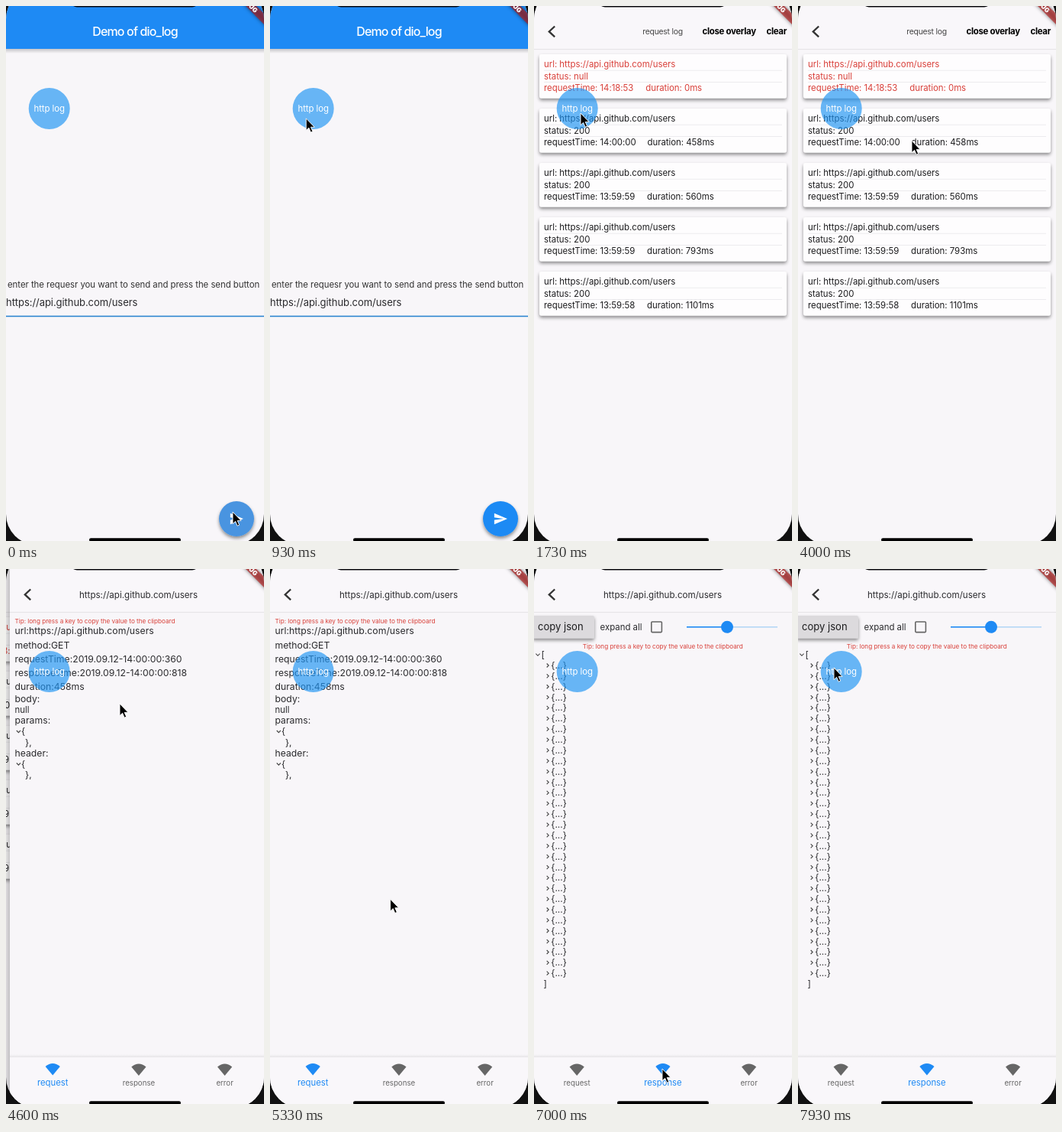
Write an HTML page that moves like this. It is 338x699 px and loops after 8 s.

```html
<!DOCTYPE html>
<html lang="en">
<head>
<meta charset="utf-8">
<title>HTTP log demo</title>
<style>
  html, body { margin: 0; width: 100%; height: 100%; overflow: hidden; background: #111; }
  svg { display: block; width: 100vw; height: 100vh; }
  text { font-family: Inter, "Open Sans", sans-serif; white-space: pre; }
</style>
</head>
<body>
<svg id="stage" viewBox="0 0 338 699" xmlns="http://www.w3.org/2000/svg"></svg>
<script>
const W = 338, LOOP = 8000;
const BLUE = '#1e8af4', INK = '#2b2b2e', RED = '#d9403a', PAPER = '#f8f6f9';
const URL_TEXT = 'https://api.github.com/users';
const TIP = 'Tip: long press a key to copy the value to the clipboard';

const text = (x, y, str, size = 11.43, attrs = '') =>
  `<text x="${x}" y="${y}" font-size="${size}" fill="${INK}" ${attrs}>${str}</text>`;
const rect = (x, y, w, h, fill, attrs = '') =>
  `<rect x="${x}" y="${y}" width="${w}" height="${h}" fill="${fill}" ${attrs}/>`;
const line = (d, color, width) =>
  `<path d="${d}" fill="none" stroke="${color}" stroke-width="${width}"/>`;
const styled = (color, spacing = 0, rest = '') =>
  `style="fill:${color};letter-spacing:${spacing}px" ${rest}`;
const MID = 'text-anchor="middle"';

const paper = () => rect(0, -23, W, 740, PAPER);
const edge = () => rect(-17, -23, 17, 740, 'url(#edge)');
const topBar = () =>
  rect(0, -23, W, 79, '#f9f7fa') + rect(0, 56, W, 1.5, 'url(#lineShade)') +
  line('M27.2 26.5L19.8 33.4L27.2 40.3', '#333', 2.3);

function homePage() {
  return paper() +
    rect(0, 56, W, 6, 'url(#barShade)') + rect(0, -23, W, 79, BLUE) +
    text(169, 39, 'Demo of dio_log', 16, styled('#fff', -0.85, MID + ' font-weight="500"')) +
    text(2, 367.5, 'enter the requesr you want to send and press the send button', 11.43, styled('#333', -0.05)) +
    text(0, 392.3, URL_TEXT, 13.06, styled(INK, -0.08)) +
    rect(0, 404.6, W, 1.6, '#2f86d0') +
    `<circle id="fab" cx="302" cy="670" r="23" filter="url(#lift)"/>
     <path transform="translate(292.2 660.2) scale(.816)" fill="#fff" d="M2 21L23 12 2 3v7l15 2-15 2z"/>`;
}

function card(y, status, time, duration, durationX, color) {
  const put = (x, dy, str) => text(x, y + dy, str, 11.43, styled(color, -0.03));
  return rect(7, y, 324, 57.5, '#fefdfe', 'rx="3" filter="url(#lift)"') +
    rect(13, y + 20.8, 312, .7, '#e6e4e8') + rect(13, y + 36.3, 312, .7, '#e6e4e8') +
    put(13, 17, 'url: ' + URL_TEXT) + put(13, 32.6, 'status: ' + status) +
    put(13, 48.1, 'requestTime: ' + time) + put(durationX, 48.1, `duration: ${duration}ms`);
}

function logPage() {
  const rows = [
    ['null', '14:18:53', 0, 146.2, RED],
    [200, '14:00:00', 458, 148.5, '#1c1c1e'],
    [200, '13:59:59', 560, 148, '#1c1c1e'],
    [200, '13:59:59', 793, 148, '#1c1c1e'],
    [200, '13:59:58', 1101, 148, '#1c1c1e'],
  ];
  return edge() + paper() + topBar() +
    text(168.5, 37, 'request log', 10.4, styled('#444', -0.25, MID)) +
    text(220.5, 37, 'close overlay', 11.43, styled('#000', -0.3, 'font-weight="700"')) +
    text(304.5, 37, 'clear', 11.43, styled('#000', -0.3, 'font-weight="700"')) +
    rows.map((r, i) => card(63 + 71 * i, ...r)).join('');
}

const chevronDown = (x, y) => line(`M${x - 2.6} ${y - 1.3}l2.6 2.6l2.6 -2.6`, '#444', 1.1);
const chevronRight = (x, y) => line(`M${x - 1.3} ${y - 2.5}l2.5 2.5l-2.5 2.5`, '#444', 1.1);

function requestTab() {
  const lines = [
    [85.4, 'url:' + URL_TEXT], [103.7, 'method:GET'],
    [121.7, 'requestTime:2019.09.12-14:00:00:360'],
    [139.7, 'responseTime:2019.09.12-14:00:00:818'],
    [157.7, 'duration:458ms'], [173.7, 'body:'], [202.3, 'params:'], [244.7, 'header:'],
  ];
  const braces = y => chevronDown(11.4, y) + text(15, y + 4, '{', 12) + text(20, y + 18.3, '},', 12);
  return text(6.5, 71, TIP, 8.16, styled(RED, -0.02)) +
    lines.map(([y, s]) => text(6.5, y, s, 12.24)).join('') +
    text(6.5, 187.7, 'null') + braces(212.3) + braces(254.8);
}

function responseTab() {
  let rows = '';
  for (let i = 0; i < 30; i++) {
    const y = 126 + 13.87 * i;
    rows += chevronRight(18, y) + text(22.3, y + 4, '{...}', 12);
  }
  return rect(-2, 61, 81, 29.5, '#dcdadd', 'rx="2" filter="url(#lift)"') +
    text(5, 80, 'copy json', 13.06, styled('#1c1c1e')) +
    text(86.5, 79.7, 'expand all') +
    rect(153.8, 69, 13.6, 13.6, 'none', 'rx="1" stroke="#666" stroke-width="1.6"') +
    rect(253, 75, 66, 1.6, '#b5d7f6') + rect(200, 75, 53, 1.6, BLUE) +
    `<circle cx="253" cy="75.8" r="8" fill="${BLUE}"/>` +
    text(168.7, 103.5, TIP, 8.16, styled(RED, -0.02, MID)) +
    chevronDown(5, 112) + text(9.5, 116, '[', 12) + rows + text(12.5, 546, ']', 12);
}

const TABS = ['request', 'response', 'error'];
const tabItem = (name, i) => `<g class="tab" transform="translate(${56.2 + 112.7 * i} 0)">
  <path d="M-9.6 650.6Q0 642.6 9.6 650.6L0 662z"/><text ${MID} style="fill:inherit">${name}</text></g>`;

function detailPage() {
  return edge() + paper() + topBar() +
    text(168.5, 37.6, URL_TEXT, 11.6, MID) +
    `<g id="requestTab">${requestTab()}</g><g id="responseTab">${responseTab()}</g>` +
    rect(0, 634, W, 4, 'url(#navShade)') + rect(0, 638, W, 70, '#f9f7fa') +
    TABS.map(tabItem).join('');
}

// Stops are [offset, opacity] pairs of black.
const gradient = (id, x2, y2, ...stops) =>
  `<linearGradient id="${id}" x2="${x2}" y2="${y2}">${
    stops.map(([at, alpha]) => `<stop offset="${at}" stop-opacity="${alpha}"/>`).join('')}</linearGradient>`;

const stage = document.getElementById('stage');
stage.innerHTML = `<defs>
  ${gradient('edge', 1, 0, [0, 0], [.3, .016], [.6, .07], [1, .22])}
  ${gradient('barShade', 0, 1, [0, .2], [1, 0])}
  ${gradient('lineShade', 0, 1, [0, .1], [1, .02])}
  ${gradient('navShade', 0, 1, [0, 0], [1, .07])}
  <filter id="lift" x="-20%" y="-20%" width="140%" height="160%">
    <feDropShadow dx="0" dy="2.7" stdDeviation="2" flood-opacity=".44"/></filter>
  <filter id="soft" x="-20%" y="-200%" width="140%" height="500%"><feGaussianBlur stdDeviation="2.5"/></filter>
  <clipPath id="screen"><rect y="-23" width="${W}" height="727" rx="40"/></clipPath></defs>
  ${rect(0, 0, W, 699, '#111')}
  <g clip-path="url(#screen)">
    <g id="home">${homePage()}</g><g id="log">${logPage()}</g><g id="detail">${detailPage()}</g>
    <circle cx="56.7" cy="134" r="27" fill="#2196f3" fill-opacity=".67"/>
    ${text(56.7, 138, 'http log', 11.43, styled('#fff', -0.08, MID))}
    <g transform="translate(318 -3) rotate(45)">
      ${rect(-60, -4.9, 120, 9.8, '#000', 'opacity=".5" filter="url(#soft)"')}
      ${rect(-60, -4.9, 120, 9.8, '#b71c1c', 'opacity=".63"')}
      ${text(0, 3, 'DEBUG', 8.3, styled('#fff', 0, MID + ' font-weight="900"'))}
    </g>
    ${rect(84, -23, 169, 24.4, '#0b0b0f', 'rx="9"')}
    ${rect(109, 695.3, 120, 4.4, '#000', 'rx="2.2"')}
  </g>
  <path id="pointer" d="M0 0V15.6L3.6 12.3L6.1 18.2L8.7 17.1L6.2 11.4H11z" fill="#000" stroke="#fff" stroke-width=".9"/>`;

const ids = ['home', 'log', 'detail', 'fab', 'requestTab', 'responseTab', 'pointer'];
const el = Object.fromEntries(ids.map(id => [id, document.getElementById(id)]));
const tabs = [...document.querySelectorAll('.tab')];

const clamp = v => Math.min(1, Math.max(0, v));
const lerp = (a, b, k) => a + (b - a) * k;
const ease = k => k * k * (3 - 2 * k);
const span = (t, start, length) => clamp((t - start) / length);
const mix = (a, b, k) => `rgb(${a.map((v, i) => Math.round(lerp(v, b[i], k)))})`;

// Cubic bezier (.35,.91,.33,.97), solved for x by bisection.
function slideCurve(x) {
  if (x <= 0 || x >= 1) return clamp(x);
  const at = (s, p, q) => 3 * s * (1 - s) ** 2 * p + 3 * s * s * (1 - s) * q + s ** 3;
  let lo = 0, hi = 1;
  for (let i = 0; i < 24; i++) {
    const mid = (lo + hi) / 2;
    if (at(mid, .35, .33) < x) lo = mid; else hi = mid;
  }
  return at(lo, .91, .97);
}

// Pointer stops: time, x, y.
const STOPS = [
  [0, 297, 661], [70, 297, 661], [900, 47, 147], [1250, 61, 140], [1790, 61, 140],
  [2550, 149, 176], [4700, 149, 176], [5900, 165, 650], [6300, 168, 653],
  [7230, 168, 653], [7920, 47, 129], [LOOP, 47, 129],
];

function pointerAt(t) {
  const i = STOPS.findIndex(s => s[0] > t);
  const [a, b] = [STOPS[i - 1], STOPS[i]];
  const k = ease(span(t, a[0], b[0] - a[0]));
  return [lerp(a[1], b[1], k), lerp(a[2], b[2], k)];
}

const SLIDE = 300, OPEN_LOG = 1429, OPEN_DETAIL = 4369, SWITCH = 6500;
const shift = (node, x) => node.setAttribute('transform', `translate(${x} 0)`);
const show = (node, on) => node.setAttribute('display', on ? 'inline' : 'none');

function draw(t) {
  const log = slideCurve(span(t, OPEN_LOG, SLIDE));
  const detail = slideCurve(span(t, OPEN_DETAIL, SLIDE));
  shift(el.home, -W / 3 * log);
  shift(el.log, W * (1 - log) - W / 3 * detail);
  shift(el.detail, W * (1 - detail));
  show(el.home, log < 1);
  show(el.log, log > 0 && detail < 1);
  show(el.detail, detail > 0);

  const onResponse = t >= SWITCH;
  show(el.requestTab, !onResponse);
  show(el.responseTab, onResponse);
  const k = ease(span(t, SWITCH, 200));
  [1 - k, k, 0].forEach((active, i) => {
    const [icon, label] = tabs[i].children;
    tabs[i].setAttribute('fill', mix([102, 102, 102], [30, 138, 244], active));
    icon.setAttribute('transform', `translate(0 ${-.6 * active})`);
    label.setAttribute('font-size', lerp(9.7, 11.3, active));
    label.setAttribute('y', lerp(675.2, 674.8, active));
  });

  el.fab.setAttribute('fill', mix([74, 148, 224], [30, 138, 244], span(t, 70, 250)));
  const [x, y] = pointerAt(t);
  el.pointer.setAttribute('transform', `translate(${x} ${y})`);
}

const start = performance.now();
function tick() {
  draw((performance.now() - start) % LOOP);
  requestAnimationFrame(tick);
}
tick();
</script>
</body>
</html>
```
